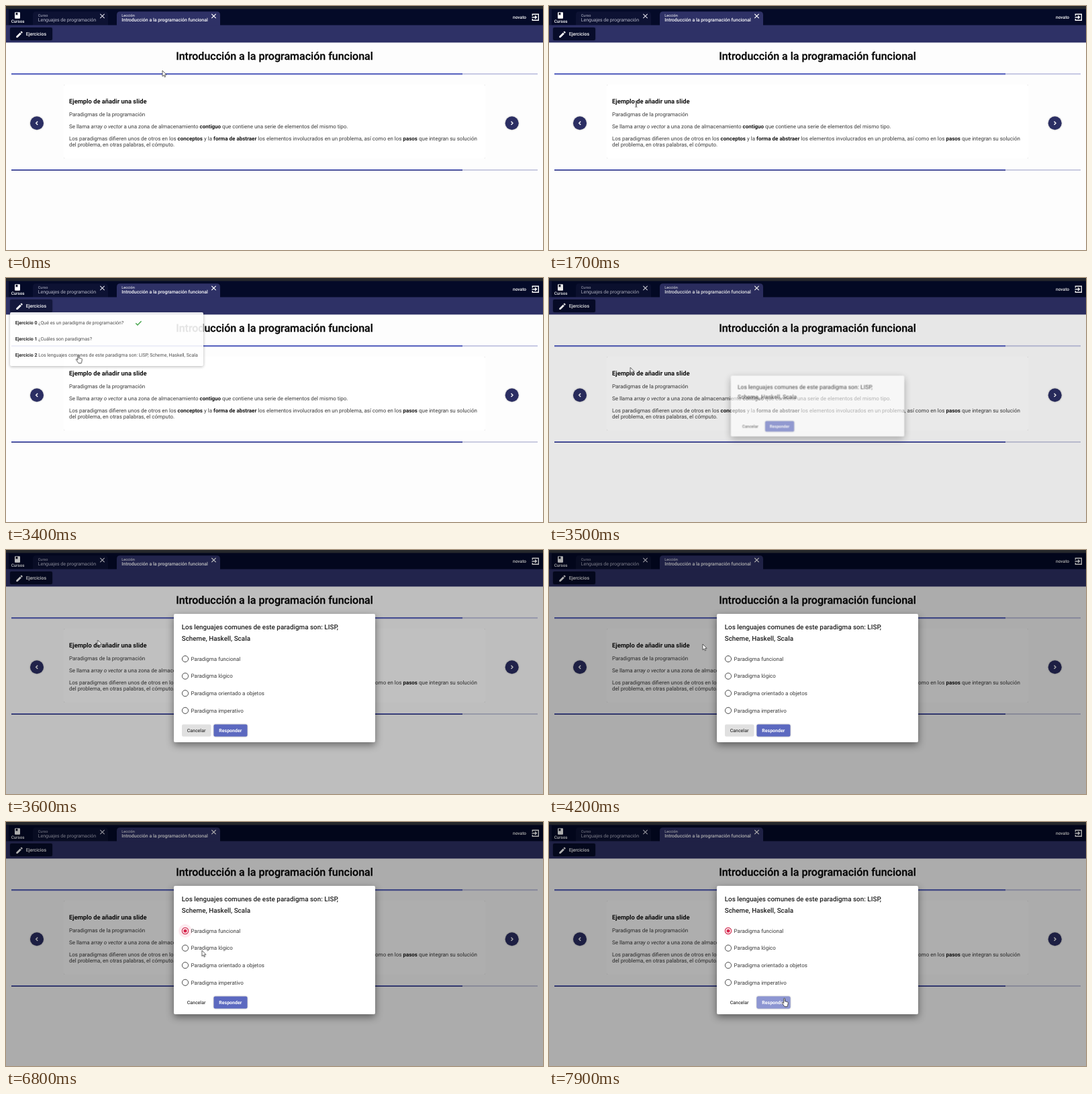
An HTML page for the animation above (8 s loop, 800 px wide and 363 px high).

```html
<!DOCTYPE html>
<html lang="es">
<head>
<meta charset="utf-8">
<title>Lección</title>
<style>
html, body { margin: 0; width: 100%; height: 100%; overflow: hidden; background: #fdfdfd; }
svg { display: block; width: 100vw; height: 100vh; }
.stage { filter: blur(.35px); }
text { font: 400 8px Roboto, sans-serif; fill: #3a3a3a; text-rendering: geometricPrecision; white-space: pre; }
.bold { font-weight: 700; fill: #161616; }
.italic { font-style: oblique 12deg; }
.title { font-size: 16px; font-weight: 500; fill: #060606; stroke: #060606; stroke-width: .25px; text-anchor: middle; }
.heading { font-size: 9.36px; font-weight: 700; fill: #101010; }
.ui, .menu text { font-size: 7px; }
.tiny { font-size: 5.6px; }
.medium { font-weight: 500; }
.white { fill: #fff; }
.muted { fill: #b4b6c8; }
.question text { font-size: 9.9px; font-weight: 500; fill: #202020; }
.line { fill: none; stroke: #fff; stroke-width: 1.4; }
.card { fill: #fff; filter: drop-shadow(0 .8px .7px #0004); }
.raised { filter: drop-shadow(0 .8px .8px #0005); }

/* Everything shares one 8 s clock */
.menu, .backdrop, .dialog, .panel, .question, .buttons, .late, .focus, .picked,
.ripple, .press, .open, .cursor, .arrow, .beam, .hand {
  animation: 8s linear infinite;
}
.panel, .question, .buttons, .late, .focus, .picked, .open, .arrow, .beam, .hand {
  animation-timing-function: step-end;
}

.menu { animation-name: menu; transform-origin: 6px 51px; filter: drop-shadow(0 1.5px 2px #0005); }
@keyframes menu {
  0%, 30% { opacity: 0; transform: scale(.8); }
  31.25%, 42.4% { opacity: 1; transform: none; }
  43.5%, 100% { opacity: 0; transform: none; }
}
.open { animation-name: open; }
@keyframes open { 0% { fill: #070c2a; } 29.8% { fill: #14183c; } 43% { fill: #070c2a; } }

.backdrop { animation-name: backdrop; }
@keyframes backdrop {
  0%, 43.2% { opacity: 0; }
  43.75% { opacity: .085; }
  45% { opacity: .25; }
  47.5%, 100% { opacity: .32; }
}
.dialog { animation-name: dialog; transform-origin: 400px 190.5px; filter: drop-shadow(0 4px 6px #0007); }
@keyframes dialog {
  0%, 43.3% { opacity: 0; transform: scale(.7); }
  43.75% { opacity: .62; transform: scale(.86); }
  45%, 100% { opacity: 1; transform: none; }
}
.panel { fill: #fff; animation-name: panel; }
@keyframes panel { 0% { y: 138px; height: 105px; } 44.75%, 100% { y: 95px; height: 191px; } }
.question { animation-name: question; }
@keyframes question { 0% { transform: translateY(43px); } 44.75%, 100% { transform: none; } }
.buttons { animation-name: buttons; }
@keyframes buttons { 0% { transform: translateY(-43px); } 44.75%, 100% { transform: none; } }
.late { animation-name: late; }
@keyframes late { 0% { opacity: 0; } 44.75%, 100% { opacity: 1; } }
.focus { animation-name: focus; }
@keyframes focus { 0% { opacity: 0; } 44.75% { opacity: 1; } 80.8%, 100% { opacity: 0; } }

.picked { animation-name: picked; }
@keyframes picked { 0% { opacity: 0; } 81%, 100% { opacity: 1; } }
.ripple { animation-name: ripple; transform-origin: 267px 162px; }
@keyframes ripple {
  0%, 80.8% { opacity: 0; transform: scale(.3); }
  82.5% { opacity: .2; transform: none; }
  87%, 100% { opacity: 0; transform: none; }
}
.press { animation-name: press; }
@keyframes press { 0%, 95.8% { opacity: 0; } 98%, 100% { opacity: .3; } }

.cursor { animation-name: cursor; }
@keyframes cursor {
  0%, 7.5% { transform: translate(233px, 96px); }
  17.5%, 21.25% { transform: translate(130px, 146px); }
  28.75%, 31.25% { transform: translate(45px, 42px); }
  33.75% { transform: translate(55px, 57px); }
  40% { transform: translate(105px, 113px); }
  42.5% { transform: translate(108px, 115px); }
  43.75% { transform: translate(121px, 133px); }
  52.5%, 56.25% { transform: translate(229px, 140px); }
  66.25% { transform: translate(292px, 160px); }
  72.5% { transform: translate(299px, 174px); }
  78.75%, 82.5% { transform: translate(268px, 162px); }
  91.25%, 100% { transform: translate(351px, 263px); }
}
.arrow { animation-name: arrow; }
@keyframes arrow {
  0% { opacity: 1; } 15% { opacity: 0; } 23.7% { opacity: 1; } 27.5% { opacity: 0; }
  43% { opacity: 1; } 62.5% { opacity: 0; } 85% { opacity: 1; } 90%, 100% { opacity: 0; }
}
.beam { animation-name: beam; }
@keyframes beam { 0% { opacity: 0; } 15% { opacity: 1; } 23.7%, 100% { opacity: 0; } }
.hand { animation-name: hand; }
@keyframes hand {
  0% { opacity: 0; } 27.5% { opacity: 1; } 43% { opacity: 0; }
  62.5% { opacity: 1; } 85% { opacity: 0; } 90%, 100% { opacity: 1; }
}
</style>
</head>
<body>
<svg viewBox="0 0 800 363" preserveAspectRatio="none">
  <defs>
    <path id="close" fill="none" stroke-width="1.2" d="M-3.2-3.2 3.2 3.2M3.2-3.2-3.2 3.2"/>
    <circle id="radio" r="4.6" fill="#fff" stroke="#4c4c4c"/>
  </defs>

  <g class="stage">
  <rect x="-5" y="-5" width="810" height="373" fill="#fdfdfd"/>

  <!-- Header and tabs -->
  <rect x="-5" y="-5" width="810" height="10" fill="#26282c"/>
  <rect x="-5" y="4.5" width="810" height="24.5" fill="#040a28"/>
  <rect x="-5" y="4.5" width="9" height="24.5" fill="#12173a"/>
  <path d="M40 29V13.3q0-5 5-5h102q5 0 5 5V29z" fill="#0d1233"/>
  <path d="M165 29V13.3q0-5 5-5h144q5 0 5 5V29z" fill="#2e3166"/>
  <rect x="-5" y="28.5" width="810" height="25.9" fill="#2e3166"/>
  <rect x="13" y="9.2" width="8" height="9.6" rx="1" fill="#fff"/>
  <path d="M14.5 10h2.8v3.8l-1.4-.9-1.4.9z" fill="#040a28"/>
  <text class="medium white" style="font-size:6.3px" x="7.7" y="25.2">Cursos</text>
  <text class="tiny muted" x="47.7" y="15.8">Curso</text>
  <text class="ui muted" x="47.7" y="23">Lenguajes de programación</text>
  <use href="#close" x="143.5" y="15" stroke="#d4d5e0"/>
  <text class="tiny white" x="172.3" y="15.8">Lección</text>
  <text class="ui medium white" x="172.3" y="23">Introducción a la programación funcional</text>
  <use href="#close" x="309.5" y="15" stroke="#fff"/>
  <text class="medium white" style="font-size:6.6px" x="775" y="19" text-anchor="end">novato</text>
  <path class="line" d="M784.3 14.5v-2.3h9v9h-9v-2.3M783.5 16.7h6.5M788 14.3l2.4 2.4-2.4 2.4"/>

  <!-- Toolbar -->
  <g class="raised">
    <rect class="open" x="6" y="32" width="63" height="19" rx="2"/>
  </g>
  <path d="M15.3 47v-2l5.6-5.6 2 2-5.6 5.6zM21.5 38.8l1-1q.5-.4 1 0l1 1q.4.5 0 1l-1 1z" fill="#fff"/>
  <text class="ui medium white" x="29.7" y="44.3">Ejercicios</text>

  <!-- Lesson -->
  <text class="title" x="400" y="80.2">Introducción a la programación funcional</text>
  <rect x="8" y="100" width="784" height="2.2" fill="#c9cbe5"/>
  <rect x="8" y="100" width="672" height="2.2" fill="#606bc2"/>
  <rect x="8" y="243" width="784" height="2" fill="#c9cbe0"/>
  <rect x="8" y="243" width="672" height="1" fill="#5c66bd"/>
  <rect x="8" y="244" width="672" height="1" fill="#3a4088"/>
  <rect class="card" x="86" y="117" width="628" height="110" rx="2"/>
  <text class="heading" x="94" y="144.7">Ejemplo de añadir una slide</text>
  <text x="94" y="164.2">Paradigmas de la programación</text>
  <text x="94" y="182">Se llama <tspan class="italic">array o vector</tspan> a una zona de almacenamiento <tspan class="bold">contiguo</tspan> que contiene una serie de elementos del mismo tipo.</text>
  <text x="94" y="199.5">Los paradigmas difieren unos de otros en los <tspan class="bold">conceptos</tspan> y la <tspan class="bold">forma de abstraer</tspan> los elementos involucrados en un problema, así como en los <tspan class="bold">pasos</tspan> que integran su solución</text>
  <text x="94" y="209">del problema, en otras palabras, el cómputo.</text>
  <g class="raised" fill="#2b2e63">
    <circle cx="46" cy="174.2" r="10"/>
    <circle cx="753.7" cy="174.2" r="10"/>
  </g>
  <path class="line" d="M47.2 171.7l-2.5 2.5 2.5 2.5M752.5 171.7l2.5 2.5-2.5 2.5"/>

  <!-- Exercise menu -->
  <g class="menu">
    <rect x="6" y="51" width="288" height="80" rx="2" fill="#fff"/>
    <text x="13.7" y="69.2"><tspan class="bold">Ejercicio 0</tspan> ¿Qué es un paradigma de programación?</text>
    <text x="13.7" y="93.2"><tspan class="bold">Ejercicio 1</tspan> ¿Cuáles son paradigmas?</text>
    <text x="13.7" y="117.2"><tspan class="bold">Ejercicio 2</tspan> Los lenguajes comunes de este paradigma son: LISP, Scheme, Haskell, Scala</text>
    <path d="M193.3 67.2l2.7 2.7 5.6-5.6" fill="none" stroke="#2f9a35" stroke-width="1.4"/>
  </g>

  <rect class="backdrop" x="-5" y="4.5" width="810" height="364"/>

  <!-- Question dialog -->
  <g class="dialog">
    <rect class="panel" x="250" width="300" rx="2"/>
    <g class="question">
      <text x="261.7" y="118.4">Los lenguajes comunes de este paradigma son: LISP,</text>
      <text x="261.7" y="134.6">Scheme, Haskell, Scala</text>
    </g>
    <g class="late">
      <use href="#radio" x="267" y="162"/>
      <use href="#radio" x="267" y="187.6"/>
      <use href="#radio" x="267" y="213.2"/>
      <use href="#radio" x="267" y="238.8"/>
      <text x="275.6" y="164.8">Paradigma funcional</text>
      <text x="275.6" y="190.4">Paradigma lógico</text>
      <text x="275.6" y="216">Paradigma orientado a objetos</text>
      <text x="275.6" y="241.6">Paradigma imperativo</text>
    </g>
    <circle class="ripple" cx="267" cy="162" r="10" fill="#e91e55"/>
    <g class="picked">
      <circle cx="267" cy="162" r="4.6" fill="#fff" stroke="#d8294f" stroke-width="1.2"/>
      <circle cx="267" cy="162" r="2.6" fill="#d8294f"/>
    </g>
    <g class="buttons">
      <rect class="focus" x="262" y="259.5" width="43.5" height="18" rx="2" fill="#e0e0e0"/>
      <text class="ui medium" x="269.7" y="270.6">Cancelar</text>
      <rect class="raised" x="309.5" y="259.5" width="50" height="18" rx="2" fill="#5c69c0"/>
      <rect class="press" x="309.5" y="259.5" width="50" height="18" rx="2" fill="#fff"/>
      <text class="ui bold white" x="317.3" y="270.6">Responder</text>
    </g>
  </g>

  <!-- Pointer -->
  <g class="cursor" stroke-linejoin="round">
    <path class="arrow" d="M0 0v8.6l2-1.8 1.3 3 1.4-.6-1.3-2.9h2.7z" fill="#fff" stroke="#222" stroke-width=".7"/>
    <path class="beam" d="M-1.6-4.5q1.6 0 1.6.8v7.4q0 .8-1.6.8M1.6-4.5q-1.6 0-1.6.8v7.4q0 .8 1.6.8" fill="none" stroke="#333" stroke-width=".8"/>
    <path class="hand" d="M-1.3-.2q.9-1.2 1.8 0v4l1.4.2 1.6.5 1.3.6q.6.4.5 1.2l-.6 3-.8 2.4H0L-1.7 9.3l-2-2.9q-.2-1.2 1-1l1.4 1.3z" fill="#fff" stroke="#222" stroke-width=".8"/>
  </g>
  </g>
</svg>
</body>
</html>
```
